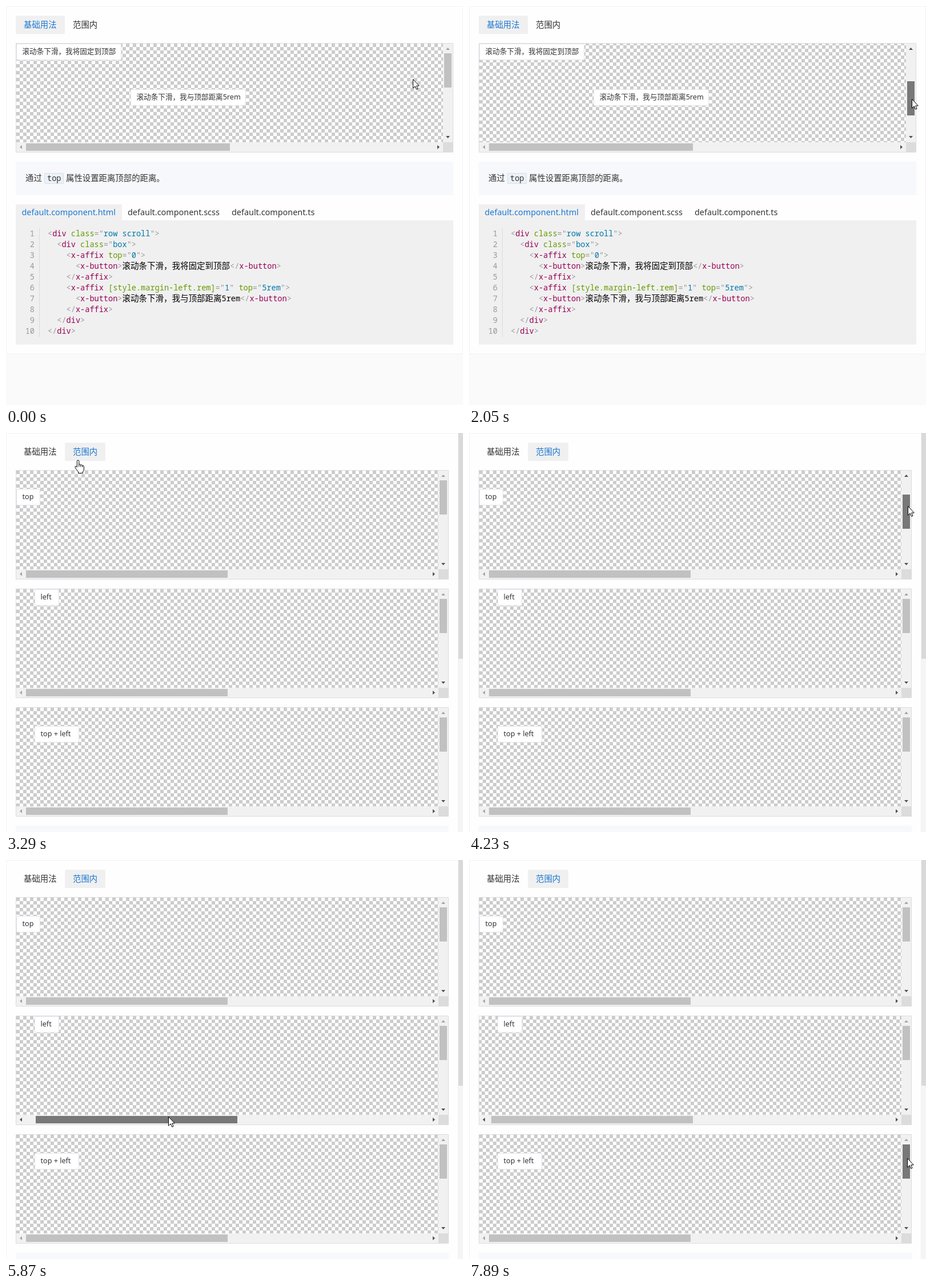
Animation of 800 by 700 pixels, one loop 7990 ms. Source, as an HTML page with a canvas:

```html
<!DOCTYPE html>
<html lang="zh-CN">
<head>
<meta charset="utf-8">
<title>Affix</title>
<style>
  html, body { margin: 0; width: 100%; height: 100%; overflow: hidden; background: #fafafa; }
  canvas { display: block; }
</style>
</head>
<body>
<canvas id="stage" width="800" height="700"></canvas>
<script>
const LOOP = 7990;
const CJK = '"Noto Sans CJK SC", "Noto Sans CJK", sans-serif';
const SANS = `"Noto Sans", ${CJK}`;
const MONO = `"Noto Sans Mono", ${CJK}`;
const TEXT = '#333', BLUE = '#1e78d2', GREY = '#f0f0f0';
const TAB_SWITCH = 3200;
const LAST_PRESS = 7800;
const POINTER_LAG = 30; // the drawn pointer trails the dragged thumb

const ctx = document.getElementById('stage').getContext('2d');

const HOME = { x: 712, y: 128 };
const LEGS = [
  { from: 70, to: 320, x: 697, y: 111 },
  { from: 500, to: 870, x: 773, y: 104 },
  // drag the first vertical thumb down and back up
  { from: 1180, to: 1510, x: 774, y: 150 },
  { from: 1660, to: 1960, x: 774, y: 188 },
  { from: 1976, to: 2375, x: 780, y: 54 },
  // click the second tab
  { from: 2540, to: 3250, x: 126, y: 47 },
  { from: 3380, to: 3920, x: 761, y: 107 },
  // drag the upper vertical thumb
  { from: 4070, to: 4400, x: 776, y: 150 },
  { from: 4400, to: 4690, x: 778, y: 120 },
  { from: 4740, to: 4790, x: 780, y: 107 },
  { from: 4930, to: 5720, x: 283, y: 450 },
  // drag the middle horizontal thumb
  { from: 5870, to: 6340, x: 543, y: 444 },
  { from: 6380, to: 6520, x: 600, y: 450 },
  { from: 6560, to: 7000, x: 287, y: 455 },
  { from: 7050, to: 7520, x: 743, y: 525 },
  { from: 7570, to: 7890, x: 767, y: 523 }
];

const clamp = (v, min, max) => Math.min(max, Math.max(min, v));

function pointerAt(t) {
  let { x, y } = HOME;
  for (const leg of LEGS) {
    const k = clamp((t - leg.from) / (leg.to - leg.from), 0, 1);
    x += (leg.x - x) * k;
    y += (leg.y - y) * k;
  }
  return { x: Math.round(x), y: Math.round(y) };
}

// A thumb follows the pointer from press to release
function drag(t, axis, press, release) {
  const now = pointerAt(clamp(t + POINTER_LAG, press, release));
  return {
    offset: t < press ? 0 : now[axis] - pointerAt(press)[axis],
    pressed: t >= press && t < release
  };
}

function rect(x, y, w, h, color, radius = 0) {
  ctx.fillStyle = color;
  ctx.beginPath();
  ctx.roundRect(x, y, w, h, radius);
  ctx.fill();
}

function frame(x, y, w, h, fill, line, radius = 0) {
  rect(x, y, w, h, line, radius);
  rect(x + 1, y + 1, w - 2, h - 2, fill, radius / 2);
}

function text(str, x, y, color = TEXT, size = 14.4, family = SANS) {
  ctx.font = `${size}px ${family}`;
  ctx.fillStyle = color;
  ctx.fillText(str, x, y);
  return x + ctx.measureText(str).width;
}

function makeChecker(cell) {
  const tile = document.createElement('canvas');
  tile.width = tile.height = cell * 2;
  const c = tile.getContext('2d');
  c.fillStyle = '#fff';
  c.fillRect(0, 0, cell * 2, cell * 2);
  c.fillStyle = '#ccc';
  c.fillRect(0, 0, cell, cell);
  c.fillRect(cell, cell, cell, cell);
  return ctx.createPattern(tile, 'repeat');
}
const checker = makeChecker(6);

// Triangle of 7 by 4 pixels with its tip pointing along (dx, dy)
function arrow(cx, cy, dx, dy, enabled) {
  ctx.fillStyle = enabled ? '#505050' : '#a3a3a3';
  ctx.beginPath();
  ctx.moveTo(cx + dx * 2, cy + dy * 2);
  ctx.lineTo(cx - dx * 2 + dy * 3.5, cy - dy * 2 + dx * 3.5);
  ctx.lineTo(cx - dx * 2 - dy * 3.5, cy - dy * 2 - dx * 3.5);
  ctx.fill();
}

function thumb(x, y, w, h, pressed, pointer) {
  const hover = pointer.x >= x && pointer.x < x + w && pointer.y >= y && pointer.y < y + h;
  rect(x, y, w, h, pressed ? '#787878' : hover ? '#a8a8a8' : '#c1c1c1');
}

const AT_REST = { offset: 0, pressed: false };

function scrollBox(y, width, pointer, { vertical = AT_REST, horizontal = AT_REST }) {
  const left = 18, top = y + 1, viewW = width - 19, viewH = 173;
  const right = left + viewW, bottom = top + viewH;
  const thumbW = Math.round((viewW - 34) / 2), thumbH = 60;
  const maxH = viewW - 34 - thumbW, maxV = viewH - 34 - thumbH;
  const h = clamp(horizontal.offset, 0, maxH), v = clamp(vertical.offset, 0, maxV);
  const scrollX = Math.round(h / maxH * viewW);
  const scrollY = Math.round(v / maxV * (400 - viewH));

  frame(17, y, width, 192, '#fff', '#dcdce2', 1);
  ctx.save();
  ctx.beginPath();
  ctx.rect(left, top, viewW, viewH);
  ctx.clip();
  ctx.translate(left - scrollX, top - scrollY);
  ctx.fillStyle = checker;
  ctx.fillRect(scrollX, scrollY, viewW, viewH);
  ctx.restore();

  rect(right, top, 17, viewH, '#f1f1f1');
  rect(left, bottom, viewW, 17, '#f1f1f1');
  rect(right, bottom, 17, 17, '#dcdcdc');
  arrow(right + 8.5, top + 9, 0, -1, v > 0);
  arrow(right + 8.5, bottom - 9, 0, 1, v < maxV);
  arrow(left + 8, bottom + 8.5, -1, 0, h > 0);
  arrow(right - 8, bottom + 8.5, 1, 0, h < maxH);
  thumb(right + 2, top + 17 + v, 13, thumbH, vertical.pressed, pointer);
  thumb(left + 17 + h, bottom + 2, thumbW, 13, horizontal.pressed, pointer);
}

function button(label, x, y, w) {
  frame(x, y, w, 29, '#fff', '#e2e3ec', 2);
  text(label, x + 10.5, y + 18, TEXT, 12.6);
}

function tabs(active, hoverSecond) {
  if (active === 0) rect(17, 17, 86, 32, GREY, 2);
  else rect(103, 17, 71, 32, GREY, 2);
  text('基础用法', 31, 38, active === 0 ? BLUE : TEXT);
  text('范围内', 117, 38, active === 1 || hoverSecond ? BLUE : TEXT);
}

const CODE = `<div class="row scroll">
  <div class="box">
    <x-affix top="0">
      <x-button>滚动条下滑，我将固定到顶部</x-button>
    </x-affix>
    <x-affix [style.margin-left.rem]="1" top="5rem">
      <x-button>滚动条下滑，我与顶部距离5rem</x-button>
    </x-affix>
  </div>
</div>`.split('\n');
const TOKEN = /(?<mark><\/?|="|"|>)|(?<tag>(?<=<\/?)[\w-]+)|(?<attr>[\w.[\]-]+(?==))|(?<value>(?<==")[^"]+)|(?<wide>[\u3000-\uffff]+)|(?<plain>\w+|\s+)/g;
const COLORS = { mark: '#999', tag: '#905', attr: '#690', value: '#07a', wide: '#000', plain: '#000' };

function codePanel() {
  rect(17, 348, 186, 28, GREY);
  rect(17, 376, 766, 218, GREY);
  text('default.component.html', 27.5, 367, BLUE);
  text('default.component.scss', 213, 367);
  text('default.component.ts', 395, 367);
  rect(58, 390, 1, 191, '#d5dbe3');
  CODE.forEach((line, i) => {
    const y = 404 + i * 19;
    ctx.textAlign = 'right';
    text(String(i + 1), 50, y, '#999', 13.6, MONO);
    ctx.textAlign = 'left';
    let x = 73;
    for (const { 0: part, groups } of line.matchAll(TOKEN)) {
      const kind = Object.keys(COLORS).find(name => groups[name]);
      x = text(part, x, y, COLORS[kind], kind === 'wide' ? 14.5 : 13.6, MONO);
    }
  });
}

function basicPage(t, pointer, overTab) {
  frame(0, 0, 800, 611, '#fefefe', '#f1f1f9');
  tabs(0, overTab);
  scrollBox(65, 766, pointer, { vertical: drag(t, 'y', 1040, 2450) });
  button('滚动条下滑，我将固定到顶部', 18, 66, 184);
  button('滚动条下滑，我与顶部距离5rem', 218, 146, 202);

  rect(17, 273, 766, 59, '#f7f8fb');
  text('通过', 34, 307);
  frame(67, 293, 34, 19, '#ebf1f7', '#d5e3f0', 1);
  text('top', 72, 307, TEXT, 13.6, MONO);
  text('属性设置距离顶部的距离。', 105, 307);
  codePanel();
}

function rangePage(t, pointer) {
  frame(0, 0, 792, 720, '#fefefe', '#f1f1f9');
  rect(792, 0, 8, 700, '#f5f5f5');
  rect(792, 0, 8, 396, '#d9d9d9');
  tabs(1);
  scrollBox(65, 758, pointer, { vertical: drag(t, 'y', 4070, 4930) });
  scrollBox(273, 758, pointer, { horizontal: drag(t, 'x', 5870, 7040) });
  scrollBox(481, 758, pointer, { vertical: { offset: 0, pressed: t >= LAST_PRESS } });
  button('top', 18, 98, 42);
  button('left', 50, 274, 43);
  button('top + left', 50, 514, 78);
  rect(17, 689, 758, 11, '#f7f8fb');
}

const ARROW = new Path2D('M.5.5V16.2L4.2 12.8 6.6 18.3 9 17.3 6.7 12H11.3Z');
const HAND = new Path2D('M6 .7Q7.8.7 7.8 2.6V8Q10 7.3 10.8 9Q13 8.3 13.8 10Q16.4 9.6 16.4 12.4V16Q16.4 19.5 14.5 21V23.4H6.5V21Q4 18 1.4 14.2Q0 11.6 2 11.2Q3.2 11.2 4.4 13V2.6Q4.4.7 6 .7Z');
const FINGERS = new Path2D('M7.8 8V12M10.8 9V12.5M13.8 10V13');

function drawPointer({ x, y }, hand) {
  const shape = hand ? HAND : ARROW;
  ctx.save();
  ctx.translate(hand ? x - 6 : x, y);
  ctx.fillStyle = '#fff';
  ctx.strokeStyle = '#000';
  ctx.fill(shape);
  ctx.stroke(shape);
  if (hand) ctx.stroke(FINGERS);
  ctx.restore();
}

const start = performance.now();

function draw() {
  const t = (performance.now() - start) % LOOP;
  const pointer = pointerAt(t);
  const overTab = pointer.x > 103 && pointer.x < 174 && pointer.y < 49;
  rect(0, 0, 800, 700, '#fafafa');
  if (t < TAB_SWITCH) basicPage(t, pointer, overTab);
  else rangePage(t, pointer);
  drawPointer(pointer, overTab);
  requestAnimationFrame(draw);
}
draw();
</script>
</body>
</html>
```
